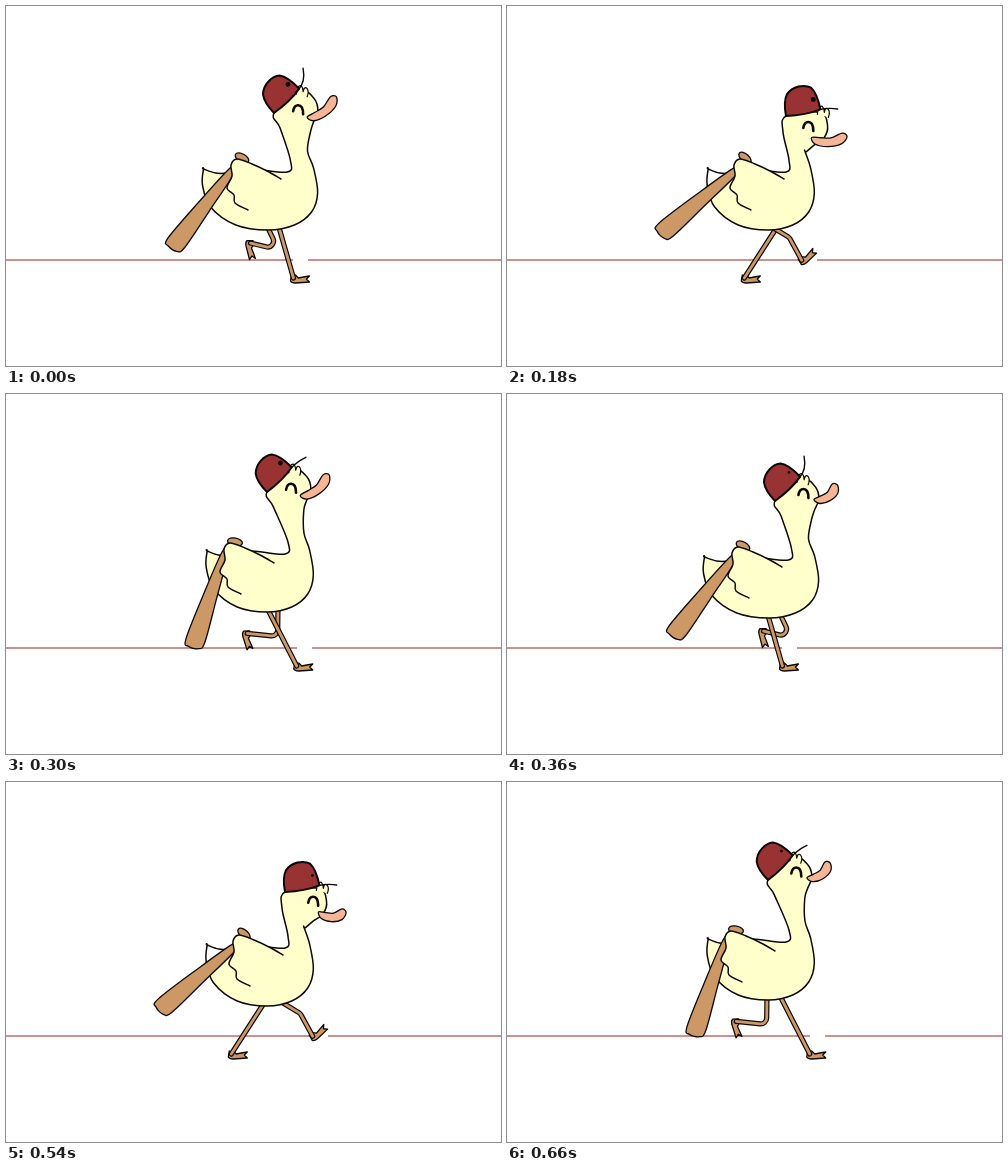
These frames come from a looping animation (495 px wide and 360 px high, 720 ms). An HTML page with a canvas:

```html
<!DOCTYPE html>
<html lang="en">
<head>
<meta charset="utf-8">
<title>Walking duck</title>
<style>
  html, body { margin: 0; width: 100%; height: 100%; overflow: hidden; background: #fff; }
  canvas { display: block; }
</style>
</head>
<body>
<canvas id="stage" width="495" height="360"></canvas>
<script>
const ctx = document.getElementById('stage').getContext('2d');
const STEP = 60, STEPS = 12, RAD = Math.PI / 180;
const INK = '#0d0806', SKIN = '#ffffcc', WOOD = '#cc9966', CAP = '#993333', BILL = '#f4b694';

// One rig: the head turns about the back corner of the cap, the torso squashes,
// the hand carries wing and bat. Each pose only sets these joints.
const poses = {
  0: { head: [268, 107], tilt: -44, squash: 1.01, rise: 2, hand: [-1, -2], bat: 128, brim: -12, pale: 0 },
  1: { head: [267, 108], tilt: -27, squash: 1, rise: 0, hand: [0, 0], bat: 139, brim: -9, pale: 0 },
  3: { head: [279, 110], tilt: -11, squash: .94, rise: 2, hand: [1, -2], bat: 140, brim: 3, pale: 1 },
  5: { head: [261, 98], tilt: -45, squash: .94, rise: 8, hand: [-8, -6], bat: 109, brim: 3, pale: 0 }
};

const torso = [284,156, 281,168, 245,165, 222,169, 210,169, 198,165, 198,165, 197,181, 205,203,
  230,221, 262,226, 288,221, 305,208, 311,189, 307,164, 301,147];
const nape = [0,0, -6,15];
const face = [13,39, 22,34, 33,29, 39,17, 34,3];
const wing = [276,175, 262,167, 247,160, 232,155, 226,161, 227,172, 222,184, 229,191, 230,199, 243,206];
const bill = [21,26, 30,28, 40,30, 52,27.5, 56,32, 49,38, 35,38, 23,33];

const mix = (a, b) => {
  if (Array.isArray(a)) return a.map((v, k) => mix(v, b[k]));
  if (typeof a === 'number') return (a + b) / 2;
  return Object.fromEntries(Object.keys(a).map(k => [k, mix(a[k], b[k])]));
};
const poseAt = i => poses[i] || mix(poses[i - 1], poses[i + 1]);

function mapPoints(p, fn) {
  const out = [];
  for (let k = 0; k < p.length; k += 2) out.push(...fn(p[k], p[k + 1]));
  return out;
}

// Smooth path through x,y pairs
function curve(p, closed) {
  const n = p.length / 2;
  const pt = k => {
    k = closed ? (k + n) % n : Math.max(0, Math.min(n - 1, k));
    return [p[2 * k], p[2 * k + 1]];
  };
  const path = new Path2D();
  path.moveTo(p[0], p[1]);
  for (let k = 0; k < (closed ? n : n - 1); k++) {
    const [a, b, c, d] = [pt(k - 1), pt(k), pt(k + 1), pt(k + 2)];
    path.bezierCurveTo(
      b[0] + (c[0] - a[0]) / 6, b[1] + (c[1] - a[1]) / 6,
      c[0] - (d[0] - b[0]) / 6, c[1] - (d[1] - b[1]) / 6, c[0], c[1]);
  }
  if (closed) path.closePath();
  return path;
}

function paint(path, fill, width = 1.5) {
  if (fill) { ctx.fillStyle = fill; ctx.fill(path); }
  ctx.strokeStyle = INK;
  ctx.lineWidth = width;
  ctx.stroke(path);
}

function place(x, y, deg, draw) {
  ctx.save();
  ctx.translate(x, y);
  ctx.rotate(deg * RAD);
  draw();
  ctx.restore();
}

function circle(x, y, rx, ry = rx) {
  const path = new Path2D();
  path.ellipse(x, y, rx, ry, 0, 0, 7);
  return path;
}

const footPath = new Path2D('M-2 -3L-3 3Q-2 5 2 5L16 4L13 1L16 -2L10 -1L5 0L2 -3');
const tuftPath = new Path2D('M-3 5Q-2 -4 2 -3Q4 -1 4 3Q5 -3 8 0Q10 3 8 8');
const eyePath = new Path2D('M-5 2Q-4 -4 0 -4Q5 -4 5 5');
const capPath = new Path2D('M0 0C0 -8 2 -17 5 -21C12 -28 24 -28 30 -23C34 -18 35 -8 35 0Q20 3 0 0Z');
const batPath = curve([-4,-3, 45,-7, 88,-10, 96,-6, 97,4, 91,9, 45,7, -4,3], true);

// Walk cycle of one leg: half a turn on the ground, then lift, kick and reach forward
function legAt(t, shift, rise) {
  const swing = Math.min(1, ((t + 2.5) % STEPS) / 7.5);
  const lift = Math.sin(Math.PI * swing ** .6);
  const hip = [266 + shift, 220 - rise];
  const ankle = [266 + shift + 38 * Math.cos((t - 3.8) * 30 * RAD), 272 - 35 * lift];
  const dx = ankle[0] - hip[0], dy = ankle[1] - hip[1];
  const bend = 26 * lift * lift / Math.hypot(dx, dy);
  const knee = [hip[0] + dx / 2 + dy * bend, hip[1] + dy / 2 - dx * bend];
  const toe = 62 * Math.sin(2 * Math.PI * swing) + 30 * Math.sin(Math.PI * swing);
  return { hip, knee, ankle, toe };
}

function drawLeg({ hip, knee, ankle, toe }) {
  place(...ankle, toe, () => paint(footPath, WOOD, 1.3));
  const path = new Path2D();
  path.moveTo(...hip);
  path.arcTo(...knee, ...ankle, 6);
  path.lineTo(...ankle);
  for (const [color, width] of [[INK, 5.2], [WOOD, 2.8]]) {
    ctx.strokeStyle = color;
    ctx.lineWidth = width;
    ctx.stroke(path);
  }
}

function drawGround(frontX) {
  ctx.fillStyle = '#cd918e';
  ctx.fillRect(0, 253, 495, 2);
  ctx.clearRect(frontX, 252, 15, 4);
}

function drawBody({ head: [hx, hy], tilt, squash, rise, hand: [wx, wy], bat, pale }) {
  const c = Math.cos(tilt * RAD), s = Math.sin(tilt * RAD);
  const onHead = (x, y) => [hx + x * c - y * s, hy + x * s + y * c];
  const trunk = mapPoints(torso, (x, y) => [250 + (x - 250) * squash, y - rise]);
  const outline = curve([...mapPoints(nape, onHead), ...trunk, ...mapPoints(face, onHead)], true);
  ctx.fillStyle = SKIN;
  ctx.fill(outline);
  ctx.globalAlpha = Math.floor(pale);
  ctx.fillStyle = '#fff';
  ctx.fill(curve(trunk.slice(6, 16), true));
  ctx.globalAlpha = 1;
  paint(outline);
  place(226 + wx, 168 + wy, bat, () => paint(batPath, WOOD, 1.3));
  place(237 + wx, 154 + wy, bat - 98, () => paint(circle(0, 0, 7.5, 4), WOOD, 1.3));
  paint(curve(mapPoints(wing, (x, y) => [x + wx, y + wy])), SKIN);
}

function drawHead({ head, tilt, brim }, turned) {
  const narrow = turned ? .77 : 1;
  place(...head, tilt, () => {
    paint(curve(mapPoints(bill, (x, y) => [56 + (x - 56) * narrow, y]), true), BILL, 1.3);
    place(35, 0, -tilt, () => paint(tuftPath, SKIN, 1.2));
    paint(capPath, CAP, 2);
    ctx.fillStyle = INK;
    ctx.fill(circle(30, -11, turned ? 1.5 : 2.4));
    const visor = new Path2D();
    visor.moveTo(34, 0);
    visor.quadraticCurveTo(44, 0, 52, brim);
    paint(visor, null, 1.4);
    place(turned ? 26 : 20, 14, -tilt, () => paint(eyePath, null, 2.6));
  });
}

function draw(i) {
  const pose = poseAt(i % 6);
  const turned = i >= 6;
  if (turned) {
    pose.head = [pose.head[0] - 1, pose.head[1] + 2];
    pose.tilt -= 3;
  }
  const near = legAt(i, -6, pose.rise);
  const far = legAt(i + 6, 6, pose.rise);
  ctx.clearRect(0, 0, 495, 360);
  drawGround(Math.max(near.ankle[0], far.ankle[0]));
  drawLeg(far);
  drawLeg(near);
  drawBody(pose);
  drawHead(pose, turned);
}

ctx.lineCap = ctx.lineJoin = 'round';
function tick() {
  draw(Math.floor(performance.now() / STEP) % STEPS);
  requestAnimationFrame(tick);
}
</script>
<script>
// Work on copies so that the poses stay untouched from loop to loop
for (const key in poses) {
  Object.freeze(poses[key]);
}
const basePose = poseAt;
</script>
<script>
tick();
</script>
</body>
</html>
```
